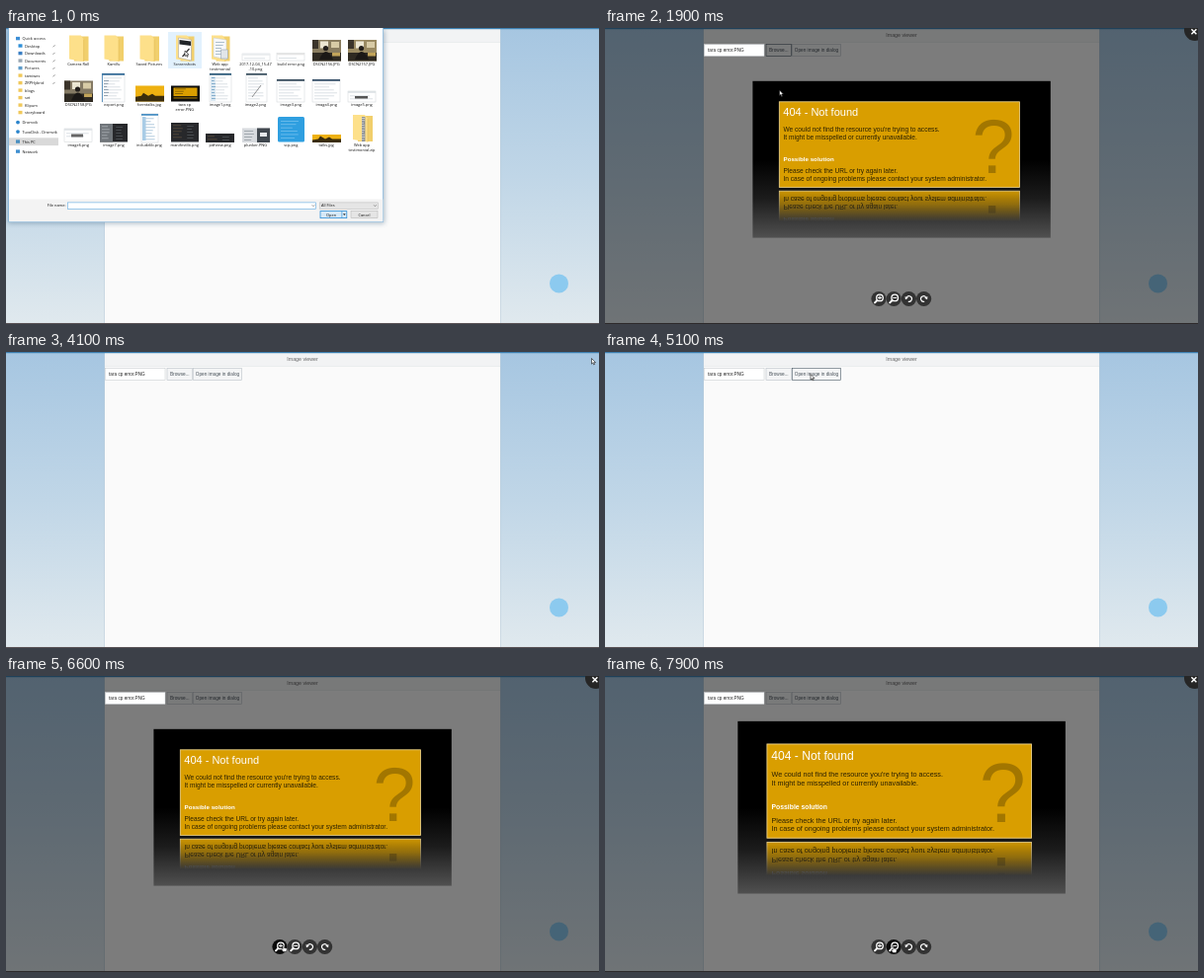
Recreate the animation shown at these times as an HTML page. Size 600 by 300 pixels, loop 8 s.

```html
<!DOCTYPE html>
<html lang="en">
<head>
<meta charset="utf-8">
<title>Image viewer</title>
<style>
html, body { margin: 0; width: 100%; height: 100%; overflow: hidden; background: #fff; }
svg { display: block; width: 100vw; height: 100vh; }
.ui { font-family: "Liberation Sans", Arial, sans-serif; }
.os { font-family: "Open Sans", "Noto Sans", sans-serif; font-size: 3.95px; fill: #111; }
</style>
</head>
<body>
<svg id="stage" viewBox="0 0 600 300" xmlns="http://www.w3.org/2000/svg"></svg>
<script>
const LOOP = 8000;
const IMAGE_NAME = 'tara cp error.PNG';

const rect = (x, y, w, h, fill, more = '') =>
  `<rect x="${x}" y="${y}" width="${w}" height="${h}" fill="${fill}" ${more}/>`;
const path = (d, more = '') => `<path d="${d}" ${more}/>`;
const circle = (x, y, r, fill, more = '') =>
  `<circle cx="${x}" cy="${y}" r="${r}" fill="${fill}" ${more}/>`;
const text = (x, y, s, more = '') => `<text x="${x}" y="${y}" ${more}>${s}</text>`;
const group = (id, body, more = '') => `<g id="${id}" ${more}>${body}</g>`;
const stroke = (color, w = 0.5) => `stroke="${color}" stroke-width="${w}"`;
const lines = (x, y, n, w, gap, color) =>
  Array.from({ length: n }, (_, i) =>
    rect(x, y + i * gap, w * (0.6 + 0.4 * Math.abs(Math.sin(i * 2.3 + x))), 0.7, color)).join('');
const gradient = (id, stops) =>
  `<linearGradient id="${id}" x1="0" y1="0" x2="0" y2="1">` +
  stops.map(([o, c]) => `<stop offset="${o}" stop-color="${c}"/>`).join('') + '</linearGradient>';

const defs = `<defs>
  ${gradient('sky', [[0, '#a6c6e1'], [0.5, '#c0d6e7'], [1, '#e0e9ee']])}
  ${gradient('floor', [[0, '#000'], [0.5, '#000'], [0.75, '#1c1c1c'], [1, '#505050']])}
  <linearGradient id="fade" gradientUnits="userSpaceOnUse" x1="0" y1="165" x2="0" y2="196">
    <stop offset="0" stop-color="#fff" stop-opacity=".95"/>
    <stop offset=".45" stop-color="#fff" stop-opacity=".6"/>
    <stop offset="1" stop-color="#fff" stop-opacity="0"/>
  </linearGradient>
  <mask id="mirror" maskUnits="userSpaceOnUse" x="170" y="164" width="260" height="40">
    ${rect(170, 164, 260, 40, 'url(#fade)')}
  </mask>
  <filter id="soft" x="-5%" y="-5%" width="110%" height="115%"><feGaussianBlur stdDeviation="2.5"/></filter>
</defs>`;

// Page behind everything
function button(id, x, w, label) {
  return rect(x, 16.5, w, 12, '#f4f5f6', `id="${id}" stroke-width=".6"`) +
    text(x + w / 2, 24.3, label, 'text-anchor="middle" font-size="4.7" fill="#49525a"');
}
const page = rect(0, 0, 600, 300, 'url(#sky)') +
  rect(99.5, 0, 401, 300, '#b9cbd9') +
  rect(100, 0, 400, 300, '#fafafa') +
  rect(100, 0, 400, 14.5, '#f2f3f4') + rect(100, 14.2, 400, 0.5, '#dfe2e4') +
  rect(0, 0, 600, 1.2, '#3f83b5') + rect(0, 299, 600, 1, '#5b5457') +
  text(300, 9.2, 'Image viewer', 'text-anchor="middle" font-size="5.3" fill="#666"') +
  button('browse', 163, 25.5, 'Browse...') +
  button('open', 189.5, 49, 'Open image in dialog') +
  circle(559.5, 259, 9.5, '#8ccaef');
const field = rect(100.3, 16.5, 60.7, 12, '#fff', stroke('#c3c8cc')) +
  text(104, 24.3, IMAGE_NAME, 'font-size="4.7" fill="#222"');

// File dialog
const folder = (x, y, w, h) =>
  rect(x + w * .25, y + 1, w * .75, h - 1.5, '#f1cf6c') +
  path(`M${x} ${y}h${w * .6}l${w * .15} 4v${h - 4}l${-w * .75} -2.5z`, 'fill="#fde08a"') +
  path(`M${x + w * .75} ${y + 4}v${h - 4}`, stroke('#e3bb55', .6));

const photo = (x, y, wall) =>
  rect(x, y, 29, 21.5, wall) + rect(x, y, 6, 9, '#3b342a') +
  rect(x + 8, y + 1.5, 8, 7, '#ece6d2') + rect(x + 19, y + 2, 8, 6, '#d8cba6') +
  rect(x, y + 13, 29, 8.5, '#2f2a22') +
  circle(x + 13.5, y + 8.5, 2.6, '#221e1b') + path(`M${x + 7} ${y + 20}q6.5 -16 14 0z`, 'fill="#1b1816"') +
  rect(x + 20, y + 13, 8, 3.5, '#c2a45a');

const sheet = (x, y, w, h, bar, ink = '#ccd3d9') =>
  rect(x, y, w, h, '#fff', stroke('#cfd3d6')) + rect(x, y, w, 1.8, bar) +
  lines(x + 2, y + 4.5, Math.max(1, Math.floor((h - 5) / 3)), w - 5, 3, ink);

const dark = (x, y, w, h) =>
  rect(x, y, w, h, '#27282b') + lines(x + 2, y + 2.5, Math.floor((h - 2) / 3), w * .35, 3, '#62513f') +
  lines(x + w * .58, y + 3, Math.floor((h - 3) / 3), w * .25, 3, '#54595e');

const yellow = (x, y, h) =>
  rect(x, y, 29, h, '#eeb111') +
  path(`M${x} ${y + h}v${-h * .3}l6 -1 2 -3 5 3 4 -2 3 2h9v${h * .3 + 1}z`, 'fill="#3b2d0c"');

const errorThumb = rect(167, 58.5, 29, 16, '#0d0d0d') + rect(169.5, 60.5, 24, 8.5, '#d99e00') +
  lines(171, 61.5, 3, 11, 2.3, '#6e5000') + rect(169.5, 69.8, 24, 2, '#6b4f04');

const thumbs =
  folder(64, 7.5, 19.5, 26.5) + folder(99.5, 7.5, 19.5, 26.5) + folder(135.5, 7.5, 19.5, 26.5) +
  folder(172, 7.5, 18.5, 26.5) +
  path('M174.5 10l13 2v21l-13 -3z', 'fill="#fff" ' + stroke('#999')) +
  path('M175.5 12l11.500 1.5v4.500l-11.500 -1.500z', 'fill="#202428"') + path('M178.500 29l7 -8', stroke('#333', 1.2)) +
  folder(208, 7.5, 18.5, 26.5) +
  path('M210 10l13 2v20l-13 -3z', 'fill="#f7f8fa" ' + stroke('#c5c8ca')) +
  lines(212, 14, 5, 9, 3, '#8fa6bb') + rect(217.5, 22, 7, 9, '#e1e5e9', stroke('#8a98a5')) +
  sheet(239, 26, 28, 7, '#e9ecee') + sheet(274, 25.5, 28, 7.5, '#e4e4e4') +
  photo(310, 12, '#8a7d60') + photo(346, 12, '#9a8a62') + photo(59, 53.5, '#857a64') +
  sheet(97, 46, 23, 29, '#3a6f9a') + rect(97, 46, .8, 29, '#3f7fb2') + lines(99, 53, 6, 5, 3, '#74889a') +
  yellow(131, 58.5, 16) + errorThumb +
  sheet(206, 46, 22, 29, '#34607e') + rect(207, 49, 5, 25, '#dbe8f2') + lines(208, 50, 8, 4, 3, '#5f94ba') +
  sheet(243, 46, 21, 29, '#425766') + path('M249 70l9 -12', stroke('#777', .8)) +
  sheet(274, 52, 28, 23, '#3b4f60') + sheet(310, 52, 28, 23, '#39526a') +
  sheet(346, 64, 28, 11, '#dde2e5') + rect(353, 69, 13, 2.5, '#555') +
  sheet(59, 102, 28, 13.5, '#dfe3e6') + rect(66, 107.5, 12, 3, '#666') +
  dark(95, 97, 28, 18.5) + rect(95, 97, 13, 18.5, '#70757a') + lines(97, 99.5, 5, 8, 3, '#b4b9bd') +
  sheet(137, 87, 17, 29, '#4c91c4', '#8fb3d0') + rect(138, 90, 3.5, 24, '#a9cce6') +
  dark(167, 96, 28, 19.5) + dark(202, 107, 29, 9) +
  rect(239, 101.5, 28, 14.5, '#d7dade') + rect(254, 101.5, 13, 14.5, '#41484f') +
  lines(241, 104, 4, 10, 3, '#8c949b') + rect(257, 106, 7, 4, '#e6e8ea') +
  rect(275, 90, 27, 25.5, '#2f9fe0', 'rx="1.5"') + lines(278, 94, 6, 18, 3.4, '#7cc4f0') +
  yellow(310, 108, 8) +
  folder(351, 88, 20, 27.5) + rect(360, 90, 3.4, 25, '#8b8f94') + lines(360, 91, 10, 3, 2.4, '#e8e8e8');

const names = [
  ['Camera Roll', 'KamVu', 'Saved Pictures', 'Screenshots', 'Web app|testimonial',
    '2017-12-04_15-47|-10.png', 'build error.png', 'DSCN2156.JPG', 'DSCN2157.JPG'],
  ['DSCN2158.JPG', 'export.png', 'formtalks.jpg', 'tara cp|error.PNG', 'image1.png',
    'image2.png', 'image3.png', 'image4.png', 'image5.png'],
  ['image6.png', 'image7.png', 'includelib.png', 'manifestlib.png', 'pdfview.png',
    'plunker.PNG', 'scp.png', 'talks.jpg', 'Web app|testimonial.zip']
];
const labels = names.map((row, r) => row.map((name, c) =>
  name.split('|').map((part, i) =>
    text(73.2 + c * 35.85, 38.4 + r * 41 + i * 4.9, part, 'text-anchor="middle"')).join('')
).join('')).join('');

const places = [
  ['Quick access', 10.6, '#3d8fd6'], ['Desktop', 18, '#2f8fd8', 1], ['Downloads', 25.6, '#3a7fc4', 1],
  ['Documents', 33.1, '#9aa7b2', 1], ['Pictures', 40.6, '#5d9bc9', 1], ['tamiwes', 48.1, '#f0c85a', 1],
  ['ZRPHybrid', 55.6, '#f0c85a', 1], ['blogs', 63.1, '#f0c85a'], ['set', 70.6, '#f0c85a'],
  ['Klipum', 78.1, '#f0c85a'], ['storyboard', 85.6, '#f0c85a'], ['Dromvik', 95.6, '#2a84cc'],
  ['TuvoDisk - Dromvik', 105.1, '#2a84cc'], ['This PC', 115.1, '#4a8fc0'], ['Network', 125.1, '#3f8fd0']
];
const sidebar = rect(3, 111.3, 50, 7.8, '#d9d9d9') + places.map(([name, y, color, pinned], i) => {
  const top = i === 0 || i > 10, x = top ? 10 : 12.5;
  const icon = i === 11 || i === 12 ? circle(x + 2, y, 1.9, color) : rect(x, y - 1.7, 4, 3.4, color);
  return icon + text(top ? 16.5 : 19, y + 1.5, name) +
    (pinned ? path(`M47.5 ${y + 1.3}l2 -2`, stroke('#888', .9)) : '');
}).join('');

const dialog = rect(2, 2, 381, 196, '#476a86', 'opacity=".45" filter="url(#soft)"') +
  rect(2.7, -2, 379, 198.6, '#fff', stroke('#6aa6d4', .6)) +
  rect(3.1, 173.5, 378.2, 22.7, '#f3f3f3') + sidebar +
  rect(164, 4, 34, 37, '#e2f1fd', 'id="hoverFolder"') +
  rect(164, 44, 34, 42, '#e2f1fd', 'id="hoverFile"') +
  thumbs + labels +
  text(60.5, 181.4, 'File name:', 'text-anchor="end"') +
  rect(62.3, 176.9, 251, 6.4, '#fff', stroke('#5ea9e2', .6)) +
  text(64, 181.4, IMAGE_NAME, 'id="picked"') +
  path('M309.6 179.2l1.4 1.6 1.4 -1.6', 'fill="none" ' + stroke('#555')) +
  rect(317.3, 176.9, 59, 6.4, '#e5e5e5', stroke('#b5b5b5')) + text(319, 181.4, 'All Files') +
  path('M372 179.2l1.4 1.6 1.4 -1.6', 'fill="none" ' + stroke('#555')) +
  rect(318, 185.6, 26.8, 7, '#d6e9f7', stroke('#2f8fd8', .8)) + rect(339.6, 185.6, .6, 7, '#2f8fd8') +
  text(329, 190.5, 'Open', 'text-anchor="middle"') + path('M341 188.3h2.6l-1.3 1.7z', 'fill="#222"') +
  rect(349, 185.6, 27, 7, '#e5e5e5', stroke('#b0b0b0')) +
  text(362.5, 190.5, 'Cancel', 'text-anchor="middle"');

// Lightbox
const body = 'font-size="6.58" fill="#2b2000"';
const card = group('card',
  rect(176.3, 74.8, 243.2, 86.6, '#d99e00', stroke('#f0d791', .8)) +
  text(393, 147, '?', 'text-anchor="middle" font-size="77" fill="#000" fill-opacity=".25"') +
  text(180.3, 89, '404 - Not found', 'font-size="11" fill="#fff"') +
  text(180.5, 105, "We could not find the resource you're trying to access.", body) +
  text(180.5, 113, 'It might be misspelled or currently unavailable.', body) +
  text(180.5, 134.6, 'Possible solution', 'font-size="6.2" font-weight="bold" fill="#fff"') +
  text(180.5, 147.2, 'Please check the URL or try again later.', body) +
  text(180.5, 155.2, 'In case of ongoing problems please contact your system administrator.', body));

const picture = group('picture',
  rect(149.4, 53.8, 301.4, 158.8, 'url(#floor)') + card +
  '<g mask="url(#mirror)"><use href="#card" transform="matrix(1 0 0 -1 0 326.6)"/></g>');

const lens = (x, plus) =>
  `<g fill="none" stroke="#fff" stroke-linecap="round">
    <circle cx="${x + 1}" cy="273.4" r="3.3" stroke-width="1.3"/>
    ${path(`M${x - 1.6} 276l-2.4 2.4`, 'stroke-width="2"')}
    ${path(`M${x - .6} 273.4h3.2` + (plus ? `M${x + 1} 271.8v3.2` : ''), 'stroke-width="1"')}</g>`;
const turn = (x, dir) =>
  `<g transform="translate(${x} 274.6) scale(${dir} 1)">
    ${path('M-2.2 -1.4A2.8 2.8 0 1 1 -.6 2.6', 'fill="none" ' + stroke('#fff', 1.1))}
    ${path('M-3.8 -2.6l.3 3.2 2.9 -1.4z', 'fill="#fff"')}</g>`;
const toolbar = [277, 292.2, 307.4, 322.6].map((x, i) =>
  circle(x, 274.5, 7.6, '#333', `id="tool${i}"`)).join('') +
  lens(277, true) + lens(292.2, false) + turn(307.4, 1) + turn(322.6, -1);

const lightbox = rect(0, 0, 600, 300, '#000', 'opacity=".5"') + field + picture + toolbar +
  circle(597, 2, 11, '#262626') +
  path('M593.4 1.2l5 5m0 -5l-5 5', stroke('#fff', 1.5));

const arrow = path('M0 0v5.6l1.3 -1.2 .9 2 .9 -.4 -.9 -1.9h1.8z', 'fill="#fff" ' + stroke('#111', .6));
const hand = path('M-.4 -1.6q.7 -.7 1.2 0v2l2.4 .6q.7 .3 .5 1.2l-.7 2.3h-3l-2 -2.6q.3 -.9 1.6 0z',
  'fill="#fff" ' + stroke('#111', .5));

document.getElementById('stage').innerHTML = defs +
  `<g class="ui">${page}${field}</g>` +
  group('dialog', dialog, 'class="os"') +
  group('lightbox', lightbox, 'class="ui"') +
  group('arrow', arrow) + group('hand', hand);

const $ = id => document.getElementById(id);
const show = (id, on) => $(id).setAttribute('visibility', on ? 'inherit' : 'hidden');
const within = (t, a, b) => t >= a && t < b;
const smooth = p => p * p * (3 - 2 * p);

// Value list at time t; each key is [time, ...values]
function track(keys, t) {
  const next = keys.findIndex(k => k[0] > t);
  if (next < 0) return keys[keys.length - 1].slice(1);
  if (next === 0) return keys[0].slice(1);
  const a = keys[next - 1], b = keys[next];
  const p = smooth((t - a[0]) / (b[0] - a[0]));
  return a.slice(1).map((v, i) => v + (b[i + 1] - v) * p);
}

const pointer = [
  [0, 181, 23], [200, 181, 26], [700, 177, 62], [2000, 176.5, 63], [2500, 184, 120],
  [2700, 215, 180], [3000, 390, 150], [3450, 592.5, 6.5], [4120, 592.5, 6.5], [4450, 243, 77],
  [5050, 208, 22.5], [6150, 208, 22.5], [6500, 280.5, 275], [7120, 280.5, 275], [7280, 291.5, 276]
];
const zoom = [
  [6630, 1], [6800, 1.1], [6820, 1.1], [6990, 1.21], [7030, 1.21], [7180, 1.331],
  [7300, 1.331], [7490, 1.21], [7640, 1.21], [7860, 1.1]
];

function draw(t) {
  const [x, y] = track(pointer, t);
  const [s] = track(zoom, t);
  const viewing = within(t, 1800, 3600) || t >= 5300;
  const onTool = t >= 6450;

  show('dialog', t < 1800);
  show('hoverFolder', t < 500);
  show('hoverFile', within(t, 600, 1800));
  show('picked', within(t, 1400, 1800));
  show('lightbox', viewing);
  show('arrow', !onTool);
  show('hand', onTool);
  for (const id of ['arrow', 'hand']) $(id).setAttribute('transform', `translate(${x} ${y})`);

  $('picture').setAttribute('transform', `translate(300 133.2) scale(${s}) translate(-300 -133.2)`);
  $('browse').setAttribute('stroke', within(t, 1800, 3600) ? '#4a5a66' : '#bcc4ca');
  $('open').setAttribute('stroke', within(t, 5000, 6200) ? '#4a5a66' : '#bcc4ca');
  $('tool0').setAttribute('fill', within(t, 6450, 7200) ? '#0c0c0c' : '#333');
  $('tool1').setAttribute('fill', t >= 7200 ? '#0c0c0c' : '#333');
}

const start = performance.now();
function tick() {
  draw((performance.now() - start) % LOOP);
  requestAnimationFrame(tick);
}
tick();
</script>
</body>
</html>
```
